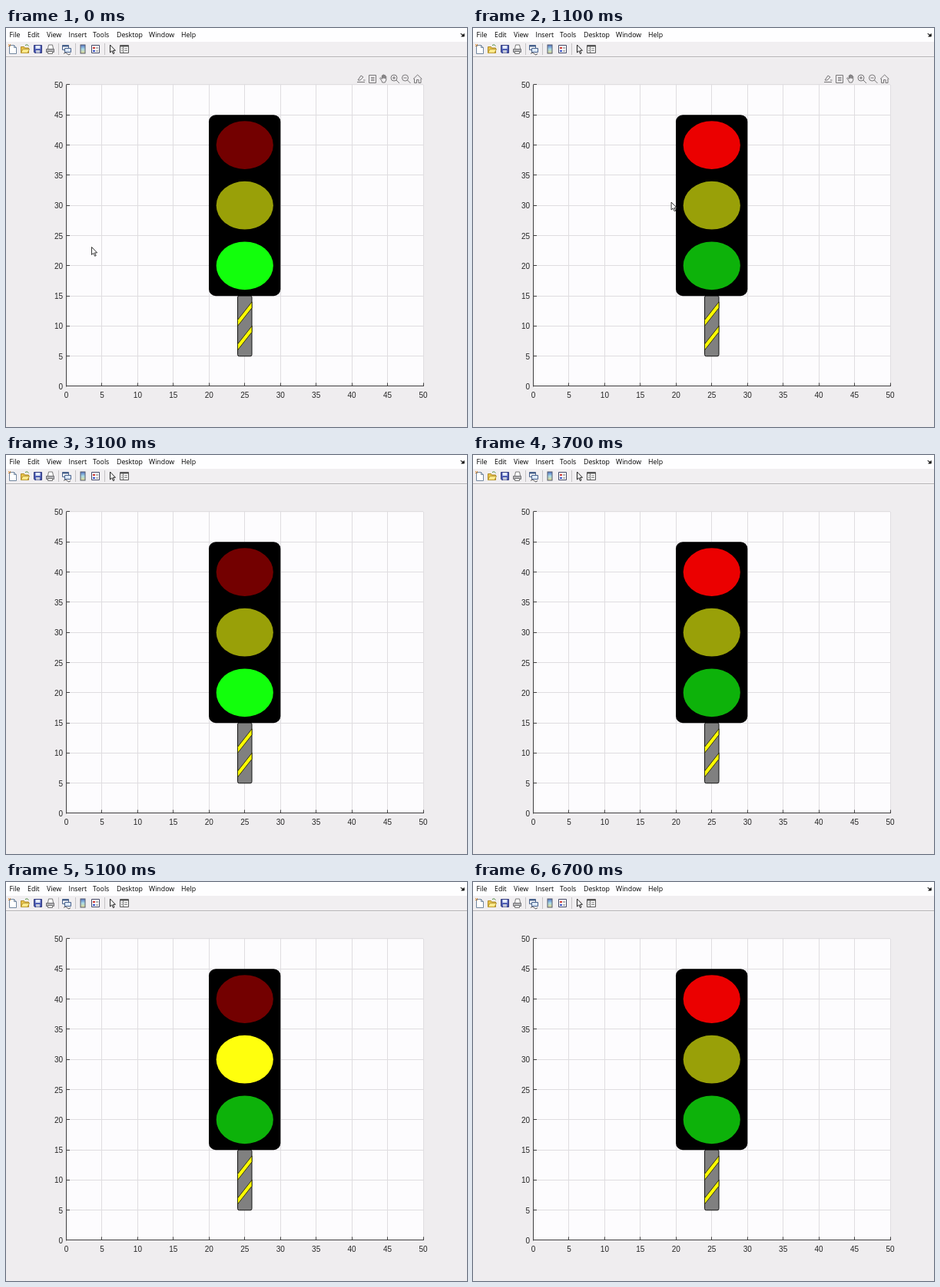
An HTML page that plays this animation: 600x520 px, repeating every 6.8 s.

```html
<!DOCTYPE html>
<html lang="en">
<head>
<meta charset="utf-8">
<title>Traffic light plot</title>
<style>
html, body { margin: 0; width: 100%; height: 100%; overflow: hidden; background: #efedef; }
svg { display: block; width: 600px; height: 520px; }
.menu { font: 8.8px "Open Sans", "Noto Sans", sans-serif; fill: #000; }
.label { font: 10px "Liberation Sans", Arial, sans-serif; fill: #262626; }
</style>
</head>
<body>
<svg viewBox="0 0 600 520" xmlns="http://www.w3.org/2000/svg">
  <rect width="600" height="520" fill="#efedef"/>
  <rect width="600" height="18" fill="#fefeff"/>
  <rect y="18" width="600" height="19" fill="#f1eff1"/>
  <path d="M0 37.5H600" stroke="#b4b2b4"/>
  <path d="M0 38.5H600" stroke="#f8f7f8"/>
  <g id="menu" class="menu"></g>
  <path d="M591.5 7.5q3 0 4 3M596.3 7.5v3.5h-3.6z" fill="#111" stroke="#111" stroke-width=".8"/>

  <g id="tools" stroke-width="1">
    <path d="M68.5 20V35M90.5 20V35M128.5 20V35" stroke="#c5c3c5"/>
    <g fill="#fff" stroke="#71869f">
      <path d="M4.5 22.5h6l3 3v8h-9z"/>
      <path d="M10.5 22.5v3h3" fill="none"/>
      <path d="M3 21l3 3M6 21l-3 3" stroke="#e08a2c"/>
    </g>
    <path d="M19.5 32.500v-8h4l1 1.500h5v6.500z" fill="#e9c44c" stroke="#b08a25"/>
    <path d="M19.500 32.500l2.500-5h8.500l-2.500 5z" fill="#ffe98a" stroke="#b99a35"/>
    <path d="M25 22.500q3-2 4.500 1" fill="none" stroke="#4d8b3c"/>
    <path d="M36.500 22.500h10v10h-9l-1-1z" fill="#4f5fb4" stroke="#30387d"/>
    <path d="M38.500 23h6v4h-6z" fill="#e4ebfb"/>
    <path d="M39 29h5v3.500h-5z" fill="#c5cada"/>
    <path d="M54.500 27l1-5h5l1 5" fill="#fff" stroke="#777"/>
    <path d="M52.500 27.500h10v4h-10z" fill="#b5b5b8" stroke="#707074"/>
    <path d="M54.500 30.500h6v3h-6z" fill="#eee" stroke="#777"/>
    <g fill="#fff" stroke="#46608b">
      <path d="M73.500 22.500h8v6h-8z"/><path d="M73.500 23.500h8" stroke-width="2"/>
      <path d="M76.500 26.500h8v5h-8z" fill="#dbe8f8"/>
      <path d="M75 33.500q2-3 4.500 0t4.500 0" fill="none" stroke="#555"/>
    </g>
    <rect x="97" y="22" width="6" height="11" fill="url(#bar)" stroke="#555b6d"/>
    <path d="M111.500 22.500h10v10h-10z" fill="#fff" stroke="#444966"/>
    <path d="M113 25h3v2h-3z" fill="#cf3a35"/><path d="M113 29h3v2h-3z" fill="#3a55c8"/>
    <path d="M117 26h3M117 30h3" stroke="#666"/>
    <path d="M135.500 22v10l2.300-2.200 1.700 3.800 1.500-.7-1.700-3.600h3.100z" fill="#fff" stroke="#222"/>
    <path d="M148.500 22.500h11v10h-11z" fill="#fff" stroke="#555"/>
    <path d="M149 23.500h10" stroke="#555" stroke-width="2"/>
    <path d="M152.500 24v8M154 27h4M154 29.500h4M150 27h1.500M150 29.500h1.500" stroke="#777"/>
  </g>
  <defs>
    <linearGradient id="bar" x2="0" y2="1">
      <stop stop-color="#5173c6"/><stop offset=".5" stop-color="#a8d9e5"/><stop offset="1" stop-color="#e5dc91"/>
    </linearGradient>
  </defs>

  <rect x="78.500" y="74.500" width="464.500" height="392.500" fill="#fdfcfe"/>
  <path id="grid" stroke="#dfdde0" fill="none"/>
  <path id="axes" stroke="#403f40" fill="none"/>
  <g id="labels" class="label"></g>

  <g id="axisTools" fill="none" stroke="#777577" stroke-width="1">
    <path d="M457 70.500h10M458 68l4-6 3 2-4 4zM465 68h2.500"/>
    <path d="M472.500 61.500h9v10h-9zM475 64.500h4.500M475 66.500h4.500M475 68.500h4.500"/>
    <path d="M488.500 68l-2-2.500 1-.7 1.800 1.500v-4.300h1.300v3.500-4.500h1.400v4.500-4h1.400v4.500-3h1.400v5l-1.500 3h-3.500z"/>
    <circle cx="505" cy="65" r="4"/><path d="M508 68l4 4M503 65h4M505 63v4"/>
    <circle cx="519.500" cy="65" r="4"/><path d="M522.500 68l4 4M517.500 65h4"/>
    <path d="M530 66.500l5.700-5.500 5.700 5.500M531.500 66v5.500h3v-4h2.500v4h3V66"/>
  </g>

  <rect x="301.500" y="349" width="18.500" height="78.700" rx="2" fill="#808080" stroke="#151515"/>
  <g id="stripes" fill="#ffff00" stroke="#151500" stroke-width=".8"></g>
  <rect x="264" y="113.200" width="93.300" height="236" rx="9" fill="#000"/>
  <g id="lamps"></g>
  <path id="cursor" d="M.5 .5v10l2.300-2.100 1.800 3.900 1.600-.7-1.800-3.700h3.200z" fill="#fff" stroke="#222" stroke-width=".9"/>
</svg>
<script>
const LOOP = 6800, STEP = 100;
const $ = id => document.getElementById(id);
const px = v => 78.5 + v * 9.29;
const py = v => 467 - v * 7.86;

function add(parent, tag, attrs, text) {
  const el = document.createElementNS("http://www.w3.org/2000/svg", tag);
  for (const key in attrs) el.setAttribute(key, attrs[key]);
  if (text !== undefined) el.textContent = text;
  return $(parent).appendChild(el);
}

const menu = { File: 4.5, Edit: 28, View: 53, Insert: 81.5, Tools: 113, Desktop: 144, Window: 186, Help: 228 };
for (const name in menu) add("menu", "text", { x: menu[name], y: 12 }, name);

let grid = "", axes = "M78.500 74V467.500M78 466.500H543.500";
for (let v = 0; v <= 50; v += 5) {
  const x = Math.floor(px(v)) + 0.5, y = Math.floor(py(v) - 0.1) + 0.5;
  grid += `M${x} 74V467M78 ${y}H543`;
  axes += `M${x} 467v-4.500M78.500 ${y}h4.500`;
  add("labels", "text", { x: px(v), y: 481.5, "text-anchor": "middle" }, v);
  add("labels", "text", { x: 74, y: py(v) + 4, "text-anchor": "end" }, v);
}
$("grid").setAttribute("d", grid);
$("axes").setAttribute("d", axes);

for (const v of [10, 6]) {
  const corners = [[24, v], [24, v + 1], [26, v + 4], [26, v + 3]];
  add("stripes", "polygon", { points: corners.map(([x, y]) => [px(x), py(y)]).join(" ") });
}

const lamps = [
  { level: 40, on: "#eb0000", off: "#730000" },
  { level: 30, on: "#ffff0d", off: "#99a008" },
  { level: 20, on: "#12ff0c", off: "#0db20a" }
];
for (const lamp of lamps)
  lamp.el = add("lamps", "ellipse", { cx: px(25), cy: py(lamp.level), rx: 37.1, ry: 31.4 });

// Pointer stops: time, x, y
const path = [[300, 111, 285], [1000, 257.5, 226.5], [1700, 259, 226.5], [2200, 259, 226.5], [2400, 423, 242]];

function pointer(t) {
  let i = 0;
  while (i < path.length - 2 && t > path[i + 1][0]) i++;
  const [a, b] = [path[i], path[i + 1]];
  const u = Math.min(1, Math.max(0, (t - a[0]) / (b[0] - a[0])));
  const e = u * u * (3 - 2 * u);
  return [a[1] + (b[1] - a[1]) * e, a[2] + (b[2] - a[2]) * e];
}

function draw(time) {
  const t = Math.floor((time % LOOP) / STEP) * STEP;
  // Red, yellow, green in turn, about one second each
  const lit = t < 100 ? 2 : Math.floor(Math.max(0, t - 100) / 1015) % 3;
  lamps.forEach((lamp, i) => lamp.el.setAttribute("fill", i === lit ? lamp.on : lamp.off));
  $("cursor").setAttribute("transform", `translate(${pointer(t)})`);
  $("cursor").setAttribute("visibility", t < 2500 ? "visible" : "hidden");
  $("axisTools").setAttribute("visibility", t < 2600 ? "visible" : "hidden");
}

const start = performance.now();
function tick() {
  draw(performance.now() - start);
  requestAnimationFrame(tick);
}
tick();
</script>
</body>
</html>
```
